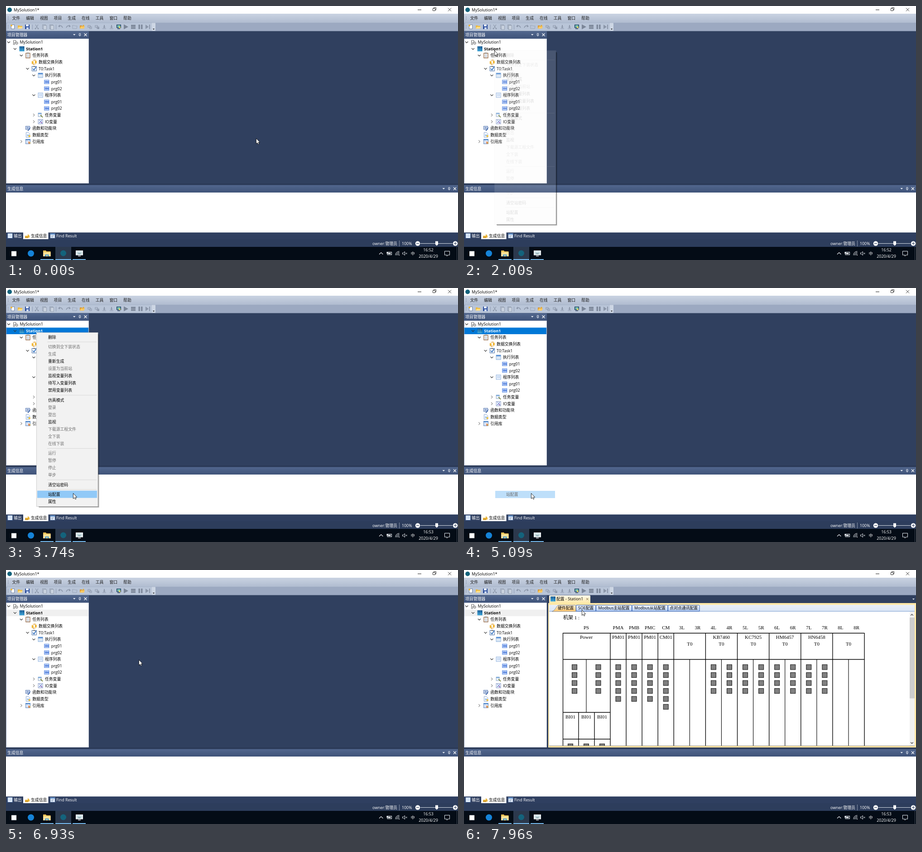
Animation of 998x561 px, one loop 8 s. Source, as an HTML page:

```html
<!DOCTYPE html>
<html lang="zh-CN">
<head>
<meta charset="utf-8">
<title>Station configuration</title>
<style>
html, body { margin: 0; width: 100%; height: 100%; overflow: hidden; background: #30405f; }
svg { display: block; width: 100vw; height: 100vh; }
text { font: 8.85px "Open Sans", "Noto Sans CJK SC", "Noto Sans CJK", sans-serif; white-space: pre; }
.page text { font: 11px "Liberation Serif", "Noto Sans CJK SC", "Noto Sans CJK", serif; }
.mid { text-anchor: middle; }
</style>
</head>
<body>
<svg id="stage" viewBox="0 0 998 561" preserveAspectRatio="none"></svg>
<script>
const rect = (x, y, w, h, fill, more = '') =>
  `<rect x="${x}" y="${y}" width="${w}" height="${h}" fill="${fill}" ${more}/>`;
const line = (d, color, w = 1, more = '') =>
  `<path d="${d}" fill="none" stroke="${color}" stroke-width="${w}" ${more}/>`;
const area = (d, fill, more = '') => `<path d="${d}" fill="${fill}" ${more}/>`;
const dot = (x, y, r, fill, more = '') => `<circle cx="${x}" cy="${y}" r="${r}" fill="${fill}" ${more}/>`;
// y is the vertical middle of the line of text
const text = (x, y, s, fill = '#000', more = '') =>
  `<text x="${x}" y="${y + 3.2}" fill="${fill}" ${more}>${s}</text>`;
const group = (id, body, more = '') => `<g id="${id}" ${more}>${body}</g>`;
const at = (x, y, body) => `<g transform="translate(${x} ${y})">${body}</g>`;
const ramp = (id, ...colors) => `<linearGradient id="${id}" x2="0" y2="1">` +
  colors.map((c, i) => `<stop offset="${i / (colors.length - 1)}" stop-color="${c}"/>`).join('') +
  '</linearGradient>';

const DARK = '#30405f', TEAL = '#14637c';
const defs = '<defs>' + ramp('bar', '#cad3e2', '#b0bcd0') + ramp('head', '#52678e', '#3f5379') +
  ramp('docTab', '#fffaec', '#ffe8a6') + ramp('tab', '#f4f8ff', '#b4cdf4') +
  ramp('hotTab', '#fff3dc', '#ffc66a') + ramp('strip', '#e9eff8', '#dbe6f5') +
  ramp('station', '#0f4f8a', '#39a3d8') +
  '<clipPath id="view"><rect x="188" y="92" width="796" height="296"/></clipPath></defs>';

function titleBar() {
  return rect(0, 0, 998, 17, '#fff') + dot(8, 8.5, 5, TEAL) + text(17, 8.5, 'MySolution1*') +
    line('M909 8.5h8', '#222') + line('M942.5 5.5h5v5h-5zM944.5 5.5v-2h5v5h-2', '#222', .9) +
    line('M976 4.5l7 7m0-7l-7 7', '#222', .9);
}

function menuBar() {
  const names = '文件 编辑 视图 项目 生成 在线 工具 窗口 帮助'.split(' ');
  return rect(0, 17, 998, 20, 'url(#bar)') + line('M5 23v9', '#77849b', 1.2, 'stroke-dasharray="1.2 1.8"') +
    names.map((s, i) => text(13.5 + 30.7 * i, 27, s, '#1b1b1b')).join('');
}

function toolBar() {
  const g = '#8b96a9', folder = c => area('M-5-3h4l1 1h5l-1 6h-9z', c);
  const sheet = (c, f) => rect(-3.5, -4.5, 7, 9, f, `stroke="${c}" stroke-width=".8"`);
  const curve = line('M-4-1q5-4 8 3', g, 1.6) + area('M-6-1l4-4v6z', g);
  const gear = line('M-4-3h5v4h-5zM0 0h4v4h-4z', g, 1.1);
  const arrow = area('M-1-4h2v4h2l-3 3l-3-3h2zM-4 3.5h8v1h-8z', g);
  const icons = [
    [15, sheet('#5a6f96', '#fff') + dot(-3, -3, 2, '#f2b632')],
    [31, folder('#edb93c') + area('M-3 0h9l-2 4h-9z', '#ffdf8a')],
    [47, rect(-5, -5, 10, 10, '#2d4f9e') + rect(-3, -5, 6, 4, '#e7eefb') + rect(-2, 1, 5, 4, '#cad8f0')],
    [68, line('M-3-5l5 8M3-5l-5 8', g, 1.1) + dot(-3, 4, 1.4, g) + dot(3, 4, 1.4, g)],
    [84, sheet(g, '#bcc7d8') + at(2, 1.5, sheet(g, '#c9d2df'))],
    [100, sheet(g, '#b2bdcc') + at(2, 1.5, sheet(g, '#c9d2df'))],
    [121, curve], [137, `<g transform="scale(-1 1)">${curve}</g>`],
    [152, line('M-5-3h4l1 1h5l-1 6h-9z', g, 1, 'stroke-dasharray="2 1"')],
    [168, folder('#d8952c') + area('M-3-1h9l-2 5h-9z', '#f7c964') + dot(3, -3, 1.6, '#e4b13b')],
    [185, gear], [201, gear + dot(3, 3, 2, g)], [217, arrow], [233, arrow],
    [249, rect(-5, -5, 10, 7.5, '#1f3f63') + rect(-3.5, -3.8, 7, 5, '#79c3b4') + rect(-3, 3.5, 6, 1.5, '#2d4262') + dot(2, 1, 2, '#e2d45b')],
    [265, area('M-5-5.5l10 5.5l-10 5.5z', '#7b8698')], [281, rect(-5, -4.5, 10, 9, '#7f8a9c') + rect(-5, 0, 10, 1, '#a8b2c2')],
    [297, rect(-4.5, -5, 3.5, 10, '#7f8a9c') + rect(1, -5, 3.5, 10, '#7f8a9c')],
    [313, area('M-5-5l7 5l-7 5z', g) + rect(3, -5, 2, 10, g)]
  ];
  return rect(0, 37, 998, 18.5, '#9ca9c1') + rect(2, 37.5, 328, 17.5, '#b9c5d8', 'rx="1.5"') +
    rect(322, 37.5, 8, 17.5, '#cdd6e4') +
    line('M5 42v9', '#77849b', 1.2, 'stroke-dasharray="1.2 1.8"') +
    line('M58.5 41v11M110.5 41v11', '#8592a9', .8) + icons.map(([x, b]) => at(x, 46, b)).join('') +
    area('M324 50h4l-2 2.5z', '#222') ;
}

function panelHead(y, w, name, right) {
  const x = w - right;
  return rect(0, y, w, 16.5, 'url(#head)') + text(3, y + 8.5, name, '#fff') +
    at(x, y + 8, area('M-27.5-1.5h5.5l-2.75 3z', '#e8edf5') +
      line('M-14-3h3v4h-3zM-15 1h5M-12.5 1v3', '#e8edf5', .9) + line('M-3-3l6 6m0-6l-6 6', '#fff', 1.1));
}

const box = (c, f = '#fff') => rect(-5, -5, 10, 10, f, `stroke="${c}" stroke-width=".9"`);
const ICONS = {
  gears: line('M-4-4h5v5h-5z', '#777', 1.2) + dot(3, 2, 2.6, '#ddd', 'stroke="#666"') + dot(-3, 4, 1.6, '#ddd', 'stroke="#777"'),
  station: rect(-5, -5.5, 11, 11, 'url(#station)') + line('M-3-5v10M1-5v10', '#6cc0e6', .6),
  clip: rect(-4.5, -5, 9, 10.5, '#fff', 'stroke="#8a5a34" stroke-width="1.2"') + rect(-2, -6, 4, 2, '#777') + line('M-2.5-1.5h5M-2.5 1h5M-2.5 3.5h5', '#7c8fa8', .8),
  swap: rect(-5.5, -2, 4, 6, '#f0b83a') + rect(1.5, -3, 4, 6, '#f0b83a') + line('M-3-4h6l-2-1.5M3 4.5h-6l2 1.5', '#d58c14'),
  check: box('#2f5c9c') + line('M-3 0l2.5 3l4.5-7', '#1c62b8', 1.6) + rect(-2, -6, 4, 2, '#666'),
  table: box('#6c9bd2') + rect(-5, -5, 10, 3, '#5b92d6') + line('M-5 .5h10M-5 3h10M-1.7-2v7M1.7-2v7', '#a9c6e8', .7),
  prg: rect(-5.2, -4, 10, 8, '#dbe8ff', 'stroke="#3b74dd" stroke-width=".9"') + line('M-3.5-1.5h2v3h-2zM-.7-1.5h2v3h-2zM2.4-1.7v3.2h1.4v-3.2', '#2a5fd0', .9),
  list: box('#7ea4d8', '#f2f7ff') + line('M-3-2h2M0-2h3M-3 1h2M0 1h3', '#6b9bdc', 1.1),
  vars: rect(-5, -4.5, 7, 8, '#e9f1fb', 'stroke="#7b93b5" stroke-width=".8"') + rect(-5, -4.5, 7, 2, '#6aa0d8') + line('M0 0l5 5', '#7d8a43', 1.8),
  io: box('#7f94c2', '#f3f6ff') + line('M-3 3l6-6M-3-3h2M1 3h3', '#3e63bd', 1.1) + dot(2, 2, 1.4, '#a46bb5'),
  func: rect(-5, -4.5, 9, 7, '#dce6f7', 'stroke="#4a6ca8" stroke-width=".9"') + line('M-3-2h5M-3 0h5', '#4a6ca8') + line('M-1 4l2 1l4-7', '#315aa3', 1.4),
  type: area('M-4-5.5h5l3 3v8h-8z', '#fff', 'stroke="#6d8fc4" stroke-width=".8"') + rect(-2, -1, 4, 4, '#9cc3ee') + dot(3.3, 2.5, 2.2, '#efc341'),
  lib: box('#4c78b6', '#eef4fc') + rect(-5, -5, 10, 2.2, '#4b86cc') + line('M-2-2v7', '#7fa5d6', .8) + rect(1, 0, 2, 5, '#d0643a') + rect(3.2, 1, 2, 4, '#e4b13b')
};

// depth, arrow (v open, > closed, - none), icon, label
const TREE = `0 v gears MySolution1|1 v station Station1|2 v clip 任务列表|3 - swap 数据交换列表|3 v check T0:Task1|
4 v table 执行列表|5 - prg prg01|5 - prg prg02|4 v list 程序列表|5 - prg prg01|5 - prg prg02|4 > vars 任务变量|
4 > io IO变量|2 - func 函数和功能块|2 - type 数据类型|2 > lib 引用库`.split('|').map(s => s.trim().split(' '));

function tree() {
  return rect(0, 72, 183, 320, '#8e9bb5') + rect(1, 72.5, 181.5, 319, '#fff') + rect(1, 87.5, 181, 14.5, 'none', 'id="row"') +
    TREE.map(([d, arrow, icon, s], i) => {
      const x = 13.85 * d, y = 80 + 14.62 * i, own = i === 1 ? 'id="station-name" font-weight="bold" style="font-weight:bold"' : '';
      const tip = { v: 'M-3-1.5l3 3l3-3', '>': 'M-1.5-3l3 3l-3 3', '-': '' }[arrow];
      return at(6 + x, y, line(tip, arrow === 'v' ? '#333' : '#888', 1.1)) + at(20.7 + x, y, ICONS[icon]) +
        text(30.5 + x, y, s, '#000', own);
    }).join('');
}

function bottomPanel() {
  return rect(0, 392, 998, 4, '#2b3a57') + panelHead(395.5, 998, '生成信息', 7) + rect(0, 412, 998, 88.5, '#fff') +
    rect(0, 500.5, 998, 15, '#2f3f60') + rect(38, 500, 55.5, 15, '#fff') +
    at(9, 507.5, ICONS.list) + text(17, 507.5, '输出', '#fff') +
    at(47, 507.5, area('M-5 0h6v-4l4 4v4h-10z', '#e9b53b') + rect(-5, 2, 7, 3, '#d39a28')) + text(55, 507.5, '生成信息') +
    at(103, 507.5, box('#85a3cc', '#eaf1fb') + rect(-5, -5, 10, 2.5, '#5b8cc8') + line('M-3 0h6M-3 2.5h4', '#6b86ad')) + text(111, 507.5, 'Find Result', '#fff');
}

function statusBar() {
  const knob = (x, d) => dot(x, 524.5, 5.2, '#fff') + at(x, 524.5, line(d, '#30405f', 1.2));
  return rect(0, 515.5, 998, 16.5, '#2d3d5c') + text(809, 524.8, 'owner:管理员', '#fff') +
    line('M868.5 518v13', '#8b97ac') + text(874, 524.8, '100%', '#fff') + line('M915 524.5h71', '#d5dbe5') +
    knob(909, 'M-3 0h6') + knob(992, 'M-3 0h6M0-3v6') + area('M948 519.5h6v7l-3 3l-3-3z', '#fff');
}

function taskBar() {
  const w = '#e9edf2';
  return rect(0, 532, 998, 29, '#040c16') + rect(109, 532, 35, 29, '#2c394d') +
    [[76, 29], [109, 35], [147, 29]].map(([x, n]) => rect(x, 559, n, 2, '#76b9ed')).join('') +
    rect(12, 541.5, 11, 11, '#fff') + dot(55, 546.5, 7, '#1583d8') +
    area('M82 540h6l1.5 2h9v11h-16.5z', '#f4c65a') + rect(82, 544, 16.5, 9, '#ffe29a') + area('M86 553v-4h8.5v4h-2v-2h-4.5v2z', '#3f97d4') +
    dot(126.5, 546, 6.5, TEAL) +
    rect(154, 540, 16, 10.5, '#f4f6f8') + rect(155.5, 541.5, 13, 7.5, '#cfe2e6') + line('M159 546q3 2 6 0', '#4c7380') + rect(159, 551.5, 6, 1.5, '#dfe4ea') +
    line('M824 548.5l4.2-4l4.2 4', w, 1.1) +
    rect(842, 543.5, 9.5, 6, 'none', `stroke="${w}"`) + rect(843.5, 545, 6, 3, w) + rect(840.5, 543, 3, 4, w) +
    line('M860 550.5a8 8 0 0 1 8.5-8.5M862.5 550.5a5.5 5.5 0 0 1 6-6M865 550.5a3 3 0 0 1 3.5-3.5', w, 1) + dot(868, 550, 1, w) +
    line('M875.5 545h2l3-2.5v8l-3-2.5h-2zM882.5 545l3 3m0-3l-3 3', w, .9) + text(893.8, 546.5, '中', '#fff') +
    text(932.5, 539, '16:52', '#fff', 'class="mid" id="clock"') + text(932.5, 553, '2020/4/29', '#fff', 'class="mid" style="font-size:9px"') +
    line('M968.5 541.5h11v8.5h-4l-2 2.5v-2.5h-5z', w, 1) + line('M995.5 532v29', '#4b545f', .8);
}

function blankPage() {
  return rect(188, 92, 807, 296, '#fff') + rect(984, 92, 11, 296, '#f0f0f0') + rect(984, 105, 11, 178.5, '#cdcdcd') +
    line('M986.2 100.5l2.8-2.8l2.8 2.8M986.2 380.5l2.8 2.8l2.8-2.8', '#505050', 1.3);
}

function docTabs() {
  const tabs = [[247.5, 291, 'SOE配置'], [291.5, 370.5, 'Modbus主站配置'], [371, 450, 'Modbus从站配置'], [450.5, 520, '点对点通讯配置']];
  return area('M188 73.5v-16q0-1.5 1.5-1.5h88q1.5 0 1.5 1.5v16z', 'url(#docTab)') +
    at(196, 64, ICONS.station) + text(204, 64, '配置 - Station1') + line('M270 62l4.5 4.5m0-4.5l-4.5 4.5', '#75633d', 1) +
    area('M990 63h5l-2.5 3z', '#dfe5ee') +
    area('M186 73h812v319h-812zM188 77v311.5h807v-311.5z', '#ffe8a6', 'fill-rule="evenodd"') +
    rect(188, 77, 807, 15, 'url(#strip)') + line('M188 91.2h807', '#7f9fd0') +
    tabs.map(([a, b, s]) => area(`M${a} 91v-12q0-1.5 1.5-1.5h${b - a - 3}q1.5 0 1.5 1.5v12z`, 'url(#tab)', 'stroke="#1f4fa5" stroke-width=".9"') +
      text((a + b) / 2, 84, s, '#000', 'class="mid"')).join('') +
    area('M194 91.7q5-1 9-8q3-6.200 7-6.200h35q2 0 2 2v12.200z', 'url(#hotTab)', 'stroke="#5f6f8c" stroke-width=".7"') +
    text(207, 84, '硬件配置');
}

function rackPage() {
  const STEP = 35.07, col = i => 340.5 + STEP * i;
  const label = (x, y, s) => text(x, y + .5, s, '#000', 'class="mid"');
  const leds = (x, n, y = 214.5) => Array.from({ length: n }, (_, i) =>
    rect(x - 5.5, y - 5.5 + 17.55 * i, 11, 11, '#808080', 'stroke="#111" stroke-width="1"')).join('');
  let out = text(219, 105.5, '机架 1 :') + label(270, 127, 'PS') + label(270, 148, 'Power') + leds(244, 4) + leds(296.5, 4);
  let thick = 'M218 139.500H884M218 197.500H884M218 314.500H323M218 373.500H323M218.500 139V390M253 314V390M288 314V390M323 139V390';
  let thin = 'M270 197V314';
  ['PMA', 'PMB', 'PMC', 'CM'].forEach((s, i) => {
    out += label(col(i), 127, s) + label(col(i), 148, i < 3 ? 'PM01' : 'CM01') + leds(col(i), i < 3 ? 5 : 6);
    thick += `M${col(i) + STEP / 2} 139V390`;
  });
  ['', 'KB7460', 'KC7925', 'HM6457', 'HN6458', ''].forEach((s, i) => {
    const l = col(4 + 2 * i), r = l + STEP, mid = l + STEP / 2;
    out += label(l, 127, `${i + 3}L`) + label(r, 127, `${i + 3}R`) + label(mid, 148, s) + label(mid, 163, 'T0');
    if (s) out += leds(l, 4) + leds(r, 4);
    thick += `M${r + STEP / 2} 139V390`;
    thin += `M${mid} 197V390`;
  });
  [235, 270, 305].forEach(x => out += label(x, 324, 'BI01') + leds(x, 1, 389.5));
  return line(thick, '#000', 1.35) + line(thin, '#000', 1.1) + out;
}

// "!" marks a disabled entry, "-" a separator
const ENTRIES = `删除 - !切换到全下装状态 !生成 重新生成 !设置为当前站 监视变量列表 待写入变量列表 禁用变量列表 -
仿真模式 !登录 !登出 监视 !下载源工程文件 !全下装 !在线下装 - !运行 !暂停 !停止 !单步 - 清空站密码 - 站配置 属性`.split(/\s+/);
const ROW = 16.08;
let menuY = 100.5;
const menu = ENTRIES.map(s => {
  const e = { s: s.replace('!', ''), off: s[0] === '!', y: menuY };
  menuY += s === '-' ? 5.1 : ROW;
  return e;
});
const menuText = menu.map(({ s, off, y }) => s === '-'
  ? line(`M91 ${y + 2.5}H200`, '#d5d5d5', .9)
  : text(93, y + ROW / 2, s, off ? '#6f6f6f' : '#000')).join('');

const cursor = area('M.4.4V12.300L3.100 9.900L5 13.700L6.900 12.800L5.100 9.100H8.600Z', '#fff', 'stroke="#000" stroke-width=".8" stroke-linejoin="round"');

const stage = document.getElementById('stage');
stage.innerHTML = defs + rect(0, 0, 998, 561, DARK) + titleBar() + menuBar() + toolBar() +
  panelHead(55.5, 183, '项目管理器', 7.5) + tree() +
  group('blank', blankPage()) + group('tabs', docTabs()) + group('rack', rackPage(), 'class="page" clip-path="url(#view)"') +
  bottomPanel() + statusBar() + taskBar() +
  group('shadow', rect(203, 102, 1.5, 382, '#000') + rect(72, 482.5, 131, 1.5, '#000') + rect(204.5, 103, 1.5, 382, '#000', 'opacity=".35"') + rect(73, 484, 132, 1, '#000', 'opacity=".35"')) +
  group('menu-back', rect(67.5, 98.5, 135.5, 384, '#f2f2f2', 'stroke="#c4c4c4" stroke-width=".8"')) +
  group('hover', rect(69, 0, 132, 16, '#91c9f7')) + group('menu-text', menuText) +
  group('fading', rect(69, 448, 132, 16, '#91c9f7') + text(93, 455.6, '站配置')) +
  group('cursor', cursor);

const $ = id => document.getElementById(id);
const show = (id, alpha) => {
  $(id).setAttribute('opacity', +alpha);
  $(id).setAttribute('visibility', alpha ? 'visible' : 'hidden');
};
const move = (id, x, y) => $(id).setAttribute('transform', `translate(${x} ${y})`);

// first step, last step, step count, bend x y, end x y
const MOVES = [
  [420, 1140, 10, 290, 150, 105, 101], [1230, 1620, 6, 75, 80, 67, 99], [1760, 1760, 1, 67, 98, 67, 98],
  [2770, 3510, 10, 158, 274, 149, 430], [3590, 3740, 3, 149, 442, 148, 453],
  [5660, 6000, 5, 230, 300, 293, 194], [6160, 6160, 1, 293, 193, 293, 193],
  [6830, 6930, 2, 293, 196, 293, 198], [7030, 7030, 1, 298, 201, 298, 201],
  [7130, 7630, 6, 299, 192, 284, 176], [7720, 7960, 4, 246, 100, 260, 88]
];

function pointer(t) {
  let x = 552, y = 292;
  for (const [a, b, n, cx, cy, ex, ey] of MOVES) {
    if (t < a) break;
    const gap = (b - a) / (n - 1) || 1;
    const p = Math.min(n, Math.floor((t - a) / gap + 1e-6) + 1) / n;
    const u = 1 - (1 - p) ** 1.4, v = 1 - u;
    x = v * v * x + 2 * u * v * cx + u * u * ex;
    y = v * v * y + 2 * u * v * cy + u * u * ey;
  }
  return [Math.round(x), Math.round(y)];
}

// value of the last [time, value] pair reached
const held = (t, pairs) => pairs.reduce((v, [at, next]) => t >= at ? next : v, 0);

function draw(t) {
  const [x, y] = pointer(t);
  const open = held(t, [[2000, .12], [2100, .6], [2180, 1], [5090, 0]]);
  const hot = menu.filter(e => e.s !== '-' && !e.off && e.y <= y).pop();
  move('cursor', x, y);
  show('menu-back', open);
  show('menu-text', open);
  show('shadow', open && .5);
  show('hover', open === 1 && !!hot);
  if (hot) move('hover', 0, hot.y);
  show('fading', held(t, [[5090, .58], [5170, .35], [5250, .14], [5330, 0]]));

  const row = held(t, [[2100, '#0078d7'], [5330, '#f0f0f0']]);
  $('row').setAttribute('fill', row || 'none');
  $('station-name').setAttribute('fill', row === '#0078d7' ? '#fff' : '#000');
  $('clock').textContent = t < 3260 ? '16:52' : '16:53';
  show('blank', t >= 7030);
  show('tabs', t >= 7130);
  show('rack', t >= 7230);
}

const start = performance.now();
function tick() {
  draw((performance.now() - start) % 8000);
  requestAnimationFrame(tick);
}
tick();
</script>
</body>
</html>
```
